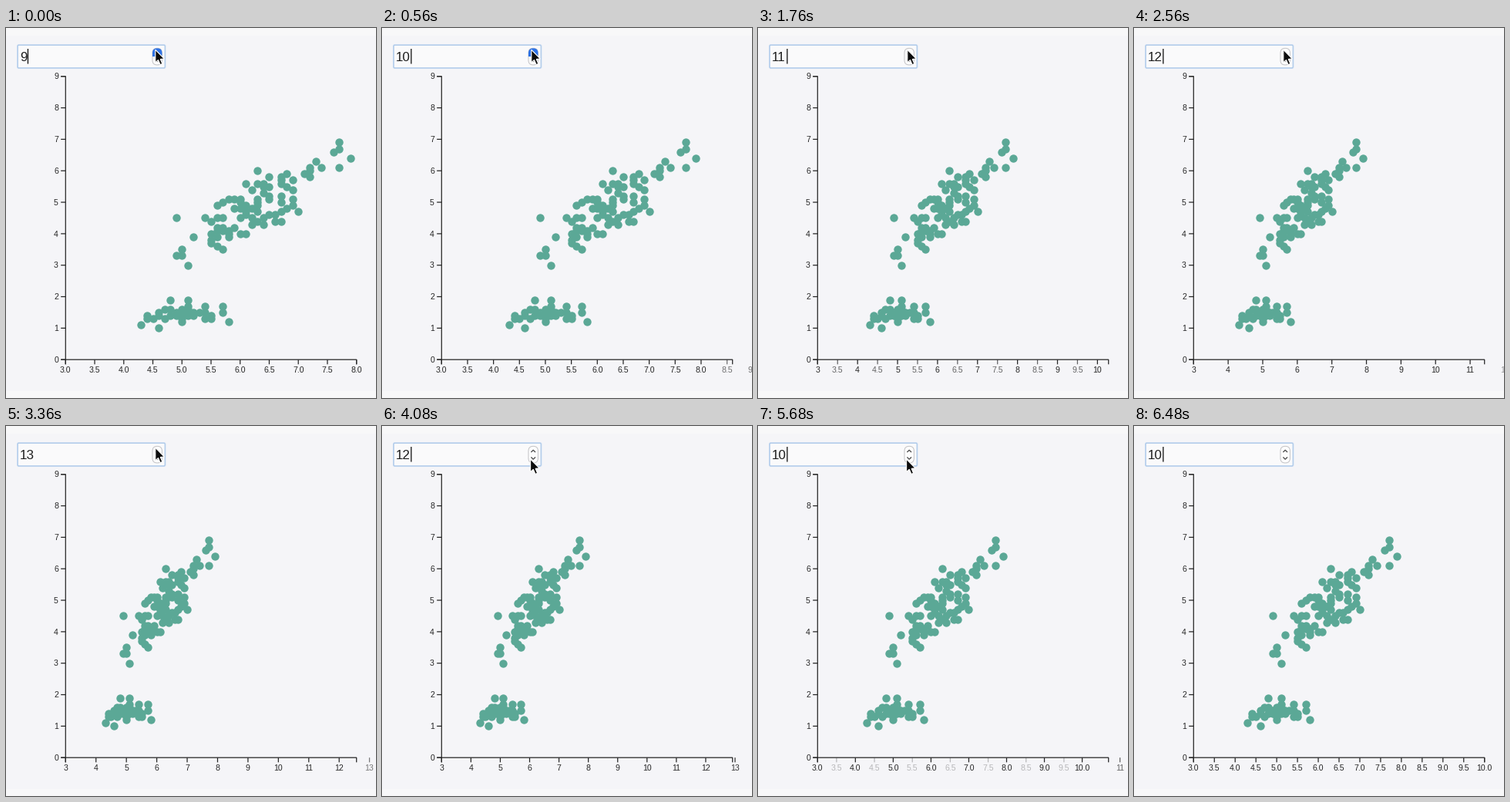
A matplotlib script for the animation above (6560 ms loop, 480 by 480 pixels).

```python
import numpy as np
import matplotlib.pyplot as plt
from matplotlib.animation import FuncAnimation
from matplotlib.patches import FancyBboxPatch, Polygon, Rectangle

plt.rcParams["font.family"] = "Liberation Sans"

SIZE, DPI = 480, 100
PT = 72 / DPI                       # points per pixel
FRAMES, INTERVAL = 82, 80

LEFT, BASE, WIDTH, UNIT_Y = 77.3, 430.2, 377.4, 40.83
X_MIN, FIRST_MAX = 3, 8
TICK, FONT = 6.1, 10.5 * PT
INK, DOT, PAGE = "#262626", "#5ba896", "#f5f5f8"

# (time of click in ms, new upper limit of the x axis)
CLICKS = [(0, 9), (470, 10), (1400, 11), (2150, 12), (2905, 13),
          (3850, 12), (4650, 11), (5323, 10)]
DURATION, BLINK, PRESS = 850, 425, 150

# Iris data in tenths: petal length -> sepal lengths
SETOSA = {
    10: [46], 11: [43], 12: [50, 58], 13: [44, 45, 47, 50, 54, 55],
    14: [44, 46, 48, 49, 50, 51, 52, 55],
    15: [46, 49, 50, 51, 52, 53, 54, 57],
    16: [47, 48, 50, 51], 17: [51, 54, 57], 19: [48, 51],
}
MEDIUM = {
    30: [51], 33: [49, 50], 35: [50, 57], 36: [56], 37: [55], 38: [55],
    39: [52, 56, 58], 40: [55, 58, 60, 61], 41: [56, 57, 58],
    42: [56, 57, 59], 43: [62, 64], 44: [55, 63, 66, 67],
    45: [49, 54, 56, 57, 60, 62, 64], 46: [61, 65, 66],
    47: [61, 63, 67, 70], 48: [59, 60, 62, 68], 49: [56, 61, 63, 69],
}
LONG = {
    50: [57, 60, 63, 67], 51: [58, 59, 60, 63, 65, 69], 52: [65, 67],
    53: [64], 54: [62, 69], 55: [64, 65, 68], 56: [61, 63, 64, 67],
    57: [67, 69], 58: [65, 67, 72], 59: [68, 71], 60: [63, 72],
    61: [72, 74, 77], 63: [73], 64: [79], 66: [76], 67: [77], 69: [77],
}
points = np.array([(s / 10, p / 10) for group in (SETOSA, MEDIUM, LONG)
                   for p, row in group.items() for s in row])


def ease(u):
    u = min(max(u, 0), 1)
    return 4 * u**3 if u < 0.5 else 1 - 4 * (1 - u)**3


def mix(a, b, e):
    return a + (b - a) * e


def scale(limit):
    return WIDTH / (limit - X_MIN)


def labels(limit):
    """Tick values and their texts for the domain up to limit."""
    step = 0.5 if limit - X_MIN < 8 else 1
    digits = 1 if step < 1 else 0
    return {float(v): f"{v:.{digits}f}"
            for v in np.arange(X_MIN, limit + 0.1, step)}


def chart_state(t):
    """Dot scale and ticks {value: (scale, opacity, text)} at time t.

    A click interrupts the running transition and starts from where it is.
    """
    limit = FIRST_MAX
    dots = scale(limit)
    ticks = {v: (dots, 1, text) for v, text in labels(limit).items()}
    ends = [start for start, _ in CLICKS[1:]] + [np.inf]
    for (start, new), end in zip(CLICKS, ends):
        if t < start:
            break
        e = ease((min(t, end) - start) / DURATION)
        wanted = labels(new)
        moved = {}
        for v in {*ticks, *wanted}:
            k, alpha, text = ticks.get(v, (scale(limit), 0, ""))
            keep = v in wanted
            if keep or e < 1:
                moved[v] = (mix(k, scale(new), e), mix(alpha, keep, e),
                            wanted.get(v, text))
        ticks, dots, limit = moved, mix(dots, scale(new), e), new
    return dots, ticks


fig = plt.figure(figsize=(SIZE / DPI, SIZE / DPI), dpi=DPI, facecolor=PAGE)
ax = fig.add_axes([0, 0, 1, 1])
ax.set(xlim=(0, SIZE), ylim=(SIZE, 0))
ax.axis("off")


def line(xs, ys, color=INK, width=1.25, **kw):
    return ax.plot(xs, ys, color=color, lw=width * PT, snap=False,
                   solid_capstyle="butt", solid_joinstyle="miter", **kw)[0]


def box(x, y, w, h, r, **kw):
    style = f"round,pad=0,rounding_size={r}"
    return ax.add_patch(FancyBboxPatch((x, y), w, h, boxstyle=style, **kw))


for y in (0, 471):
    ax.add_patch(Rectangle((0, y), SIZE, 10, color="#f8f8f9", lw=0))

# Axes
right, top = LEFT + WIDTH, BASE - 9 * UNIT_Y
line([LEFT - TICK, LEFT, LEFT, LEFT - TICK], [top, top, BASE, BASE])
line([LEFT, LEFT, right, right], [BASE + TICK, BASE, BASE, BASE + TICK])
for n in range(10):
    y = BASE - n * UNIT_Y
    line([LEFT - TICK, LEFT], [y, y])
    ax.text(LEFT - 9.4, y + 3.7, str(n), ha="right", va="baseline",
            fontsize=FONT, color=INK)

x_ticks = {}
for v in np.arange(X_MIN, 13.1, 0.5):
    mark = line([0, 0], [BASE, BASE + TICK])
    name = ax.text(0, 447, "", ha="center", va="baseline", fontsize=FONT,
                   color=INK)
    x_ticks[float(v)] = mark, name

dots = ax.scatter(points[:, 0], BASE - points[:, 1] * UNIT_Y,
                  s=(10.4 * PT)**2, color=DOT, lw=0, zorder=3)

# Number field with focus ring
box(14, 21, 193.5, 32, 2.5, fc="#d3e1f3", ec="none", zorder=4)
box(15.2, 22.2, 191, 29.6, 1.5, fc="#fafafb", ec="#abc8ea", lw=1.2 * PT,
    zorder=4)
value = ax.text(18, 43.2, "", va="baseline", fontsize=17 * PT,
                color="#1e1e1e", zorder=5)
caret = line([0, 0], [27, 46.5], "#111111", 1.3, zorder=5)

pill = box(190, 26.3, 12.4, 21.6, 6, fc="#fdfdfd", ec="#c3c3c6", lw=PT,
           zorder=5)
press = ax.add_patch(Rectangle((189.5, 26), 13.4, 11, fc="#2f73e6", lw=0,
                               zorder=6))
press.set_clip_path(pill)
chevrons = [line([193.4, 196.2, 199], [y, y + d, y], "#4a4a4a", 1.3, zorder=7)
            for y, d in ((34, -2.8), (40.4, 2.8))]

ARROW = np.array([(0, 0), (0, 16.6), (3.7, 13.2), (6.3, 19.4), (9, 18.2),
                  (6.5, 12.2), (11.6, 11.8)])
cursor = ax.add_patch(Polygon(ARROW, fc="#0c0c0c", ec="white", lw=1.1 * PT,
                              zorder=8))


def draw_chart(t):
    k, ticks = chart_state(t)
    xs = LEFT + (points[:, 0] - X_MIN) * k
    dots.set_offsets(np.column_stack([xs, BASE - points[:, 1] * UNIT_Y]))
    for v, (mark, name) in x_ticks.items():
        k, alpha, text = ticks.get(v, (0, 0, ""))
        x = LEFT + (v - X_MIN) * k
        shown = alpha > 0.01 and x < SIZE + 20
        mark.set_xdata([x, x])
        name.set_x(x)
        name.set_text(text)
        for part in (mark, name):
            part.set_visible(shown)
            part.set_alpha(alpha)


def draw_field(t):
    start, limit = [c for c in CLICKS if c[0] <= t][-1]
    since = t - start
    text = str(limit)
    value.set_text(text)
    x = 19 + 9.45 * len(text)
    caret.set_xdata([x, x])
    caret.set_visible(since % (2 * BLINK) < BLINK)

    down = start >= 3850
    pressed = since < PRESS
    press.set_y(37 if down else 26)
    press.set_visible(pressed)
    for i, chevron in enumerate(chevrons):
        chevron.set_color("white" if pressed and i == down else "#4a4a4a")

    e = ease((t - 3480) / 280)
    cursor.set_xy(ARROW + (mix(193.8, 192.6, e), mix(28.2, 43, e)))
    cursor.set_visible(t < 6160)


def draw(frame):
    t = frame * INTERVAL
    draw_chart(t)
    draw_field(t)
    return []


anim = FuncAnimation(fig, draw, frames=FRAMES, interval=INTERVAL,
                     repeat=True, repeat_delay=0, blit=False)
plt.show()
```
